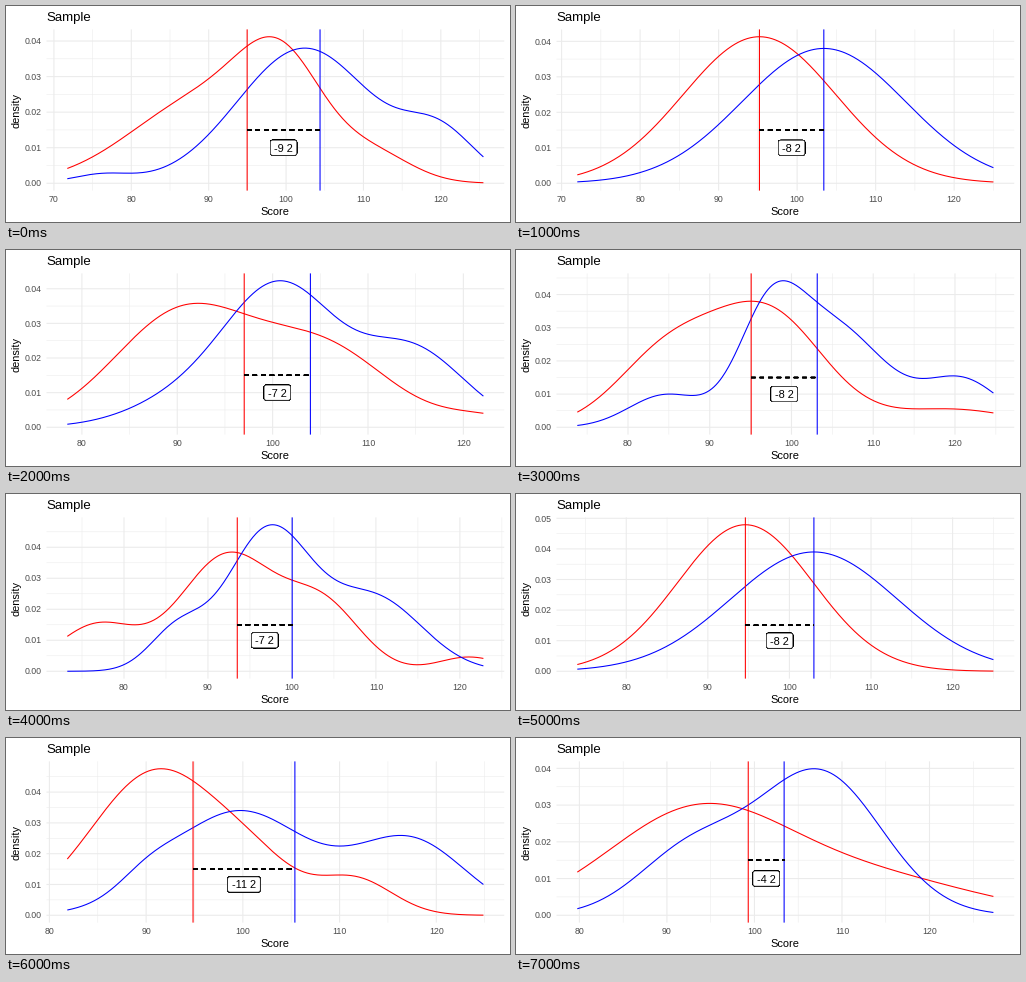
Animation of 504 by 216 pixels, one loop 8000 ms. Source, as a matplotlib script:

```python
import math

import matplotlib.pyplot as plt
import numpy as np
from matplotlib.animation import FuncAnimation
from matplotlib.patches import FancyBboxPatch

W, H, DPI = 504, 216, 72
LEFT, RIGHT, TOP, BOTTOM = 40.5, 498.2, 23.4, 184.6
PAD_X = (RIGHT - LEFT) / 22      # 5 % of the data range on each side
PAD_Y = (BOTTOM - TOP) / 22
MM = 72.27 / 25.4 * 0.75         # stroke width of one size unit, in pixels
GRID, TICK = "#ebebeb", "#4d4d4d"
ROWS = 40                        # annotations are drawn once per data row

plt.rcParams["font.family"] = "Liberation Sans"
plt.rcParams["path.snap"] = False

samples = []


def bells(*parts):
    """Sum of normal curves, each (centre, height in thousandths, spread)."""
    def density(x):
        return sum(h * np.exp(-((x - c) / s) ** 2 / 2) for c, h, s in parts)
    return density


def add(lo, hi, means, red, blue):
    x = np.linspace(lo, hi, 400)
    samples.append((x, means, (red(x), blue(x))))


add(71.73, 125.5, (94.97, 104.39),
    bells((89.7, 24, 9.6), (99.5, 25.5, 5.4), (111.6, 7, 4.9)),
    bells((76.2, 2.4, 3.8), (102.4, 38, 8.7), (119.9, 12.8, 4.7)))
add(72, 125, (95.2, 103.4),
    bells((95.2, 41.3, 9.7)),
    bells((103.4, 38, 10.4)))
add(78.47, 122.1, (97.02, 103.96),
    bells((90.8, 33.5, 7.3), (105.6, 21.5, 6.7), (122.1, 3, 4.4)),
    bells((91.9, 9, 6.2), (101, 38, 5.6), (114.5, 22.5, 5.6)))
add(73.8, 124.7, (95.07, 103.15),
    bells((84.8, 21.5, 6.2), (97.1, 34, 6.8), (119.6, 5.4, 7.6)),
    bells((84.6, 9.7, 4.5), (97.3, 28.5, 3.9), (105.2, 30, 6.2),
          (120.9, 14, 4.7)))
add(73.25, 122.8, (93.49, 100.03),
    bells((76.8, 14.8, 4.7), (92.4, 37.5, 5.7), (103.8, 20, 4.5),
          (121.1, 4.6, 3.7)),
    bells((86.3, 12.5, 3.3), (97.2, 45, 5), (109.8, 23.5, 5.7)))
add(74, 125, (94.6, 103),
    bells((94.6, 47.9, 8.3)),
    bells((103, 39, 10.2)))
add(81.85, 124.87, (94.85, 105.38),
    bells((91.2, 47, 6.8), (101.6, 10, 4.3), (111.6, 11.5, 3.9)),
    bells((90.1, 4.8, 2.9), (99.6, 33.8, 7.2), (117.3, 24, 5.7)))
add(79.76, 127.3, (99.29, 103.39),
    bells((93.4, 27.8, 10.3), (113.4, 9.9, 11.9)),
    bells((92.8, 17.3, 6.1), (107.4, 38.8, 7.1)))

fig = plt.figure(figsize=(W / DPI, H / DPI), dpi=DPI, facecolor="white")
ax = fig.add_axes([0, 0, 1, 1])


def text(x, y, s, size=8.8, color=TICK, ha="center", **kw):
    ax.text(x, y, s, fontsize=size, color=color, ha=ha, va="baseline", **kw)


def line(xs, ys, color, width=0.5 * MM, **kw):
    ax.plot(xs, ys, color=color, lw=width, solid_capstyle="butt", **kw)


def ticks(lo, hi, step):
    """Multiples of step within lo..hi."""
    return range(math.ceil(lo / step) * step, math.floor(hi) + 1, step)


def label(x, y, s):
    w, h = 2 + 6.1 * len(s), 15.1
    for _ in range(ROWS):
        ax.add_patch(FancyBboxPatch(
            (x - w / 2, y - h / 2), w, h, fc="white", ec="black",
            lw=0.25 * MM, zorder=4,
            boxstyle="round,pad=0,rounding_size=2.2"))
    text(x, y + 4, s, 11, "black", zorder=5)


def draw(i):
    xs, (a, b), curves = samples[i]
    lo, hi, peak = xs[0], xs[-1], np.max(curves)
    sx = (RIGHT - LEFT - 2 * PAD_X) / (hi - lo)
    sy = (BOTTOM - TOP - 2 * PAD_Y) / peak

    def px(x):
        return LEFT + PAD_X + (x - lo) * sx

    def py(y):
        return BOTTOM - PAD_Y - y * sy

    ax.clear()
    ax.set(xlim=(0, W), ylim=(H, 0))
    ax.axis("off")

    margin = (hi - lo) / 20
    for step, width in ((5, 0.25 * MM), (10, 0.5 * MM)):
        for x in ticks(lo - margin, hi + margin, step):
            if step == 10 or x % 10:
                line([px(x)] * 2, [TOP, BOTTOM], GRID, width)
        for y in ticks(0, peak * 1.05, step):
            if step == 10 or y % 10:
                line([LEFT, RIGHT], [py(y)] * 2, GRID, width)
    for x in ticks(lo - margin, hi + margin, 10):
        text(px(x), 196, str(x))
    for y in ticks(0, peak * 1.05, 10):
        text(36.1, py(y) + 3.2, f"{y / 1000:.2f}", ha="right")

    for ys, color in zip(curves, ("red", "blue")):
        line(px(xs), py(ys), color)
    for mean, color in ((a, "red"), (b, "blue")):
        line([px(mean)] * 2, [TOP, BOTTOM], color)
    for _ in range(ROWS):
        line([px(a), px(b)], [py(15)] * 2, "black",
             linestyle=(0, (4, 4)), dash_capstyle="butt")
    label(px((a + b) / 2), py(10), f"{a - b:.0f} 2")

    text(LEFT, 15, "Sample", 13.2, "black", ha="left")
    text((LEFT + RIGHT) / 2, 209, "Score", 11, "black")
    text(13.4, (TOP + BOTTOM) / 2, "density", 11, "black",
         rotation=90, rotation_mode="anchor")
    return []


anim = FuncAnimation(fig, draw, frames=len(samples), init_func=lambda: [],
                     interval=1000, repeat=True, repeat_delay=0, blit=False)
plt.show()
```
